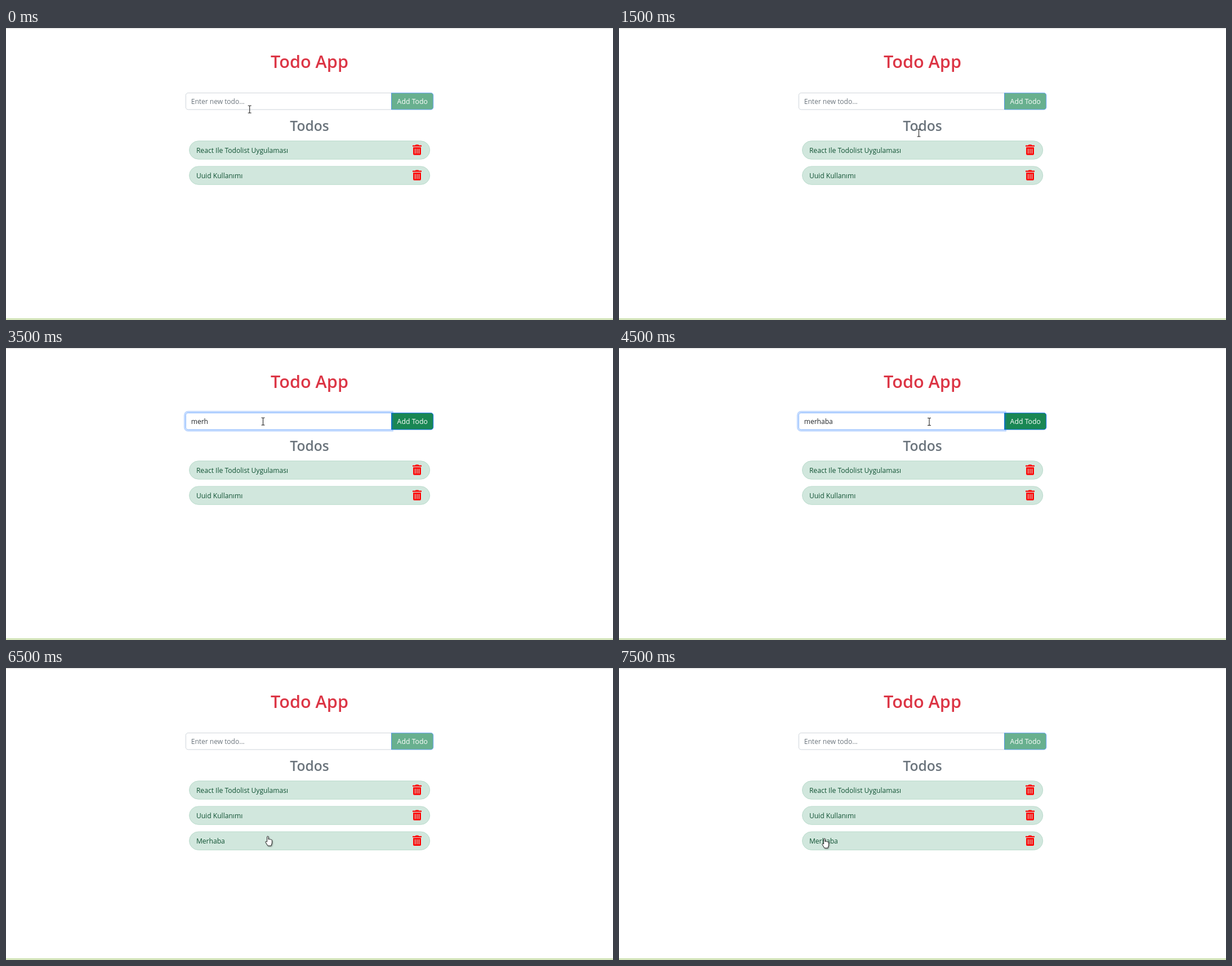
An HTML page that plays this animation: 1078 px wide and 519 px high, repeating every 8 s.

```html
<!DOCTYPE html>
<html lang="tr">
<head>
<meta charset="utf-8">
<title>Todo App</title>
<style>
  html, body { margin: 0; width: 100%; height: 100%; overflow: hidden; background: #fff; }
  svg { display: block; width: 1078px; height: 519px; font: 12.1px "Open Sans", "Noto Sans", sans-serif; }
  .heading { font-weight: 600; text-anchor: middle; }
  .pill { fill: #d1e7dd; stroke: #badbcc; }
  .item text { fill: #0f5132; }
  .hand, .arrow { fill: #fff; stroke: #111; stroke-width: .9; stroke-linejoin: round;
    filter: drop-shadow(1.2px 1.2px .8px rgba(0, 0, 0, .4)); }
  .beam { fill: none; stroke: #222; stroke-width: 1.1; }
</style>
</head>
<body>
<svg viewBox="0 0 1078 519">
  <defs>
    <g id="trash" fill="red">
      <path d="M0 48a16 16 0 0 1 16-16H136L146 13Q153 0 167 0H281Q295 0 302 13L312 32H432a16 16 0 0 1 16 16V80a16 16 0 0 1-16 16H16a16 16 0 0 1-16-16Z"/>
      <path d="M32 128H416V464a48 48 0 0 1-48 48H80a48 48 0 0 1-48-48Z"/>
      <path d="M128 208V432M224 208V432M320 208V432" stroke="#d1e7dd" stroke-width="34" stroke-linecap="round"/>
    </g>
    <path id="beam" class="beam" d="M-3-6.5H-1Q0-6.5 0-5.5Q0-6.5 1-6.5H3M0-5.5V5.5M-3 6.5H-1Q0 6.5 0 5.5Q0 6.5 1 6.5H3"/>
    <path id="arrow" class="arrow" d="M0 0V13.6L3.1 10.8L5.1 15.5L7.3 14.5L5.3 10H9.5Z"/>
    <g id="hand" class="hand">
      <path d="M3.6 11V1.8Q4.8 0 6 1.8V6.5Q7.2 5.3 8.3 6.7Q9.5 5.8 10.5 7.2Q11.9 6.8 12.4 8.2V13L10.8 18H5L.8 11.3Q1 9.5 2.6 10.5Z"/>
    </g>
  </defs>

  <rect width="1078" height="1.6" fill="#e4e4e4"/>
  <rect y="516.2" width="1078" height="2.2" fill="#c5dca3"/>
  <text class="heading" x="539" y="71" font-size="30.6" fill="#dc3545">Todo App</text>
  <text class="heading" x="539" y="183" font-size="24.6" fill="#6c757d">Todos</text>

  <path id="field" d="M684.5 115.4H323.5a4.2 4.2 0 0 0-4.2 4.2V140.8a4.2 4.2 0 0 0 4.2 4.2H684.5Z" fill="#fff"/>
  <g id="button">
    <path d="M684.5 115.4H754.6a4.2 4.2 0 0 1 4.2 4.2V140.8a4.2 4.2 0 0 1-4.2 4.2H684.5Z" fill="#198754" stroke="#0d6efd" stroke-width=".9"/>
    <text x="721.8" y="135" font-size="12.3" text-anchor="middle" fill="#fff">Add Todo</text>
  </g>
  <path id="ring" fill="#0d6efd" fill-opacity=".25" fill-rule="evenodd"
    d="M688 111.8H323.4a7.6 7.6 0 0 0-7.6 7.6V141a7.6 7.6 0 0 0 7.6 7.6H688ZM684.9 115V145.4H323a4.2 4.2 0 0 1-4.2-4.2V119.2a4.2 4.2 0 0 1 4.2-4.2Z"/>
  <text id="entry" x="328.8" y="135" font-size="12"></text>
  <g id="list"></g>
  <use id="cursor"/>
</svg>
<script>
  const $ = id => document.getElementById(id);
  const LOOP = 8000;
  const todos = ['React Ile Todolist Uygulaması', 'Uuid Kullanımı', 'Merhaba'];

  $('list').innerHTML = todos.map((label, i) => `
    <g class="item" transform="translate(325 ${200.5 + 45.1 * i})">
      <rect class="pill" x=".5" y=".3" width="427.2" height="32.4" rx="16.2"/>
      <text x="12.9" y="21">${label}</text>
      <use href="#trash" transform="translate(397 6.8) scale(.0359)"/>
    </g>`).join('');
  const items = document.querySelectorAll('.item');

  const steps = [
    { at: 0, cursor: 'beam', x: 432.7, y: 144.5 },
    { at: 500, cursor: 'hand', x: 421, y: 202 },
    { at: 1500, cursor: 'beam', x: 532.5, y: 186.5 },
    { at: 2500, cursor: 'beam', x: 456.5, y: 130.5, focus: true },
    { at: 3500, cursor: 'beam', x: 456.5, y: 130.5, focus: true, text: 'merh' },
    { at: 4500, cursor: 'beam', x: 551, y: 131, focus: true, text: 'merhaba' },
    { at: 5500, cursor: 'arrow', x: 736.8, y: 130.8, text: 'merhaba' },
    { at: 6500, cursor: 'hand', x: 460, y: 298, count: 3 },
    { at: 7500, cursor: 'hand', x: 360, y: 302, count: 3 }
  ];
  let shown;

  function show({ cursor, x, y, focus = false, text = '', count = 2 }) {
    $('cursor').setAttribute('href', '#' + cursor);
    $('cursor').setAttribute('transform', `translate(${x} ${y})`);
    $('field').setAttribute('stroke', focus ? '#86b7fe' : '#ced4da');
    $('ring').style.display = focus ? '' : 'none';
    $('button').style.opacity = text ? 1 : .65;
    $('entry').textContent = text || 'Enter new todo...';
    $('entry').style.fill = text ? '#212529' : '#6c757d';
    items.forEach((item, i) => item.style.display = i < count ? '' : 'none');
  }

  const start = performance.now();
  function tick() {
    const t = (performance.now() - start) % LOOP;
    const step = steps.findLast(s => s.at <= t);
    if (step !== shown) show(shown = step);
    requestAnimationFrame(tick);
  }
  tick();
</script>
</body>
</html>
```
